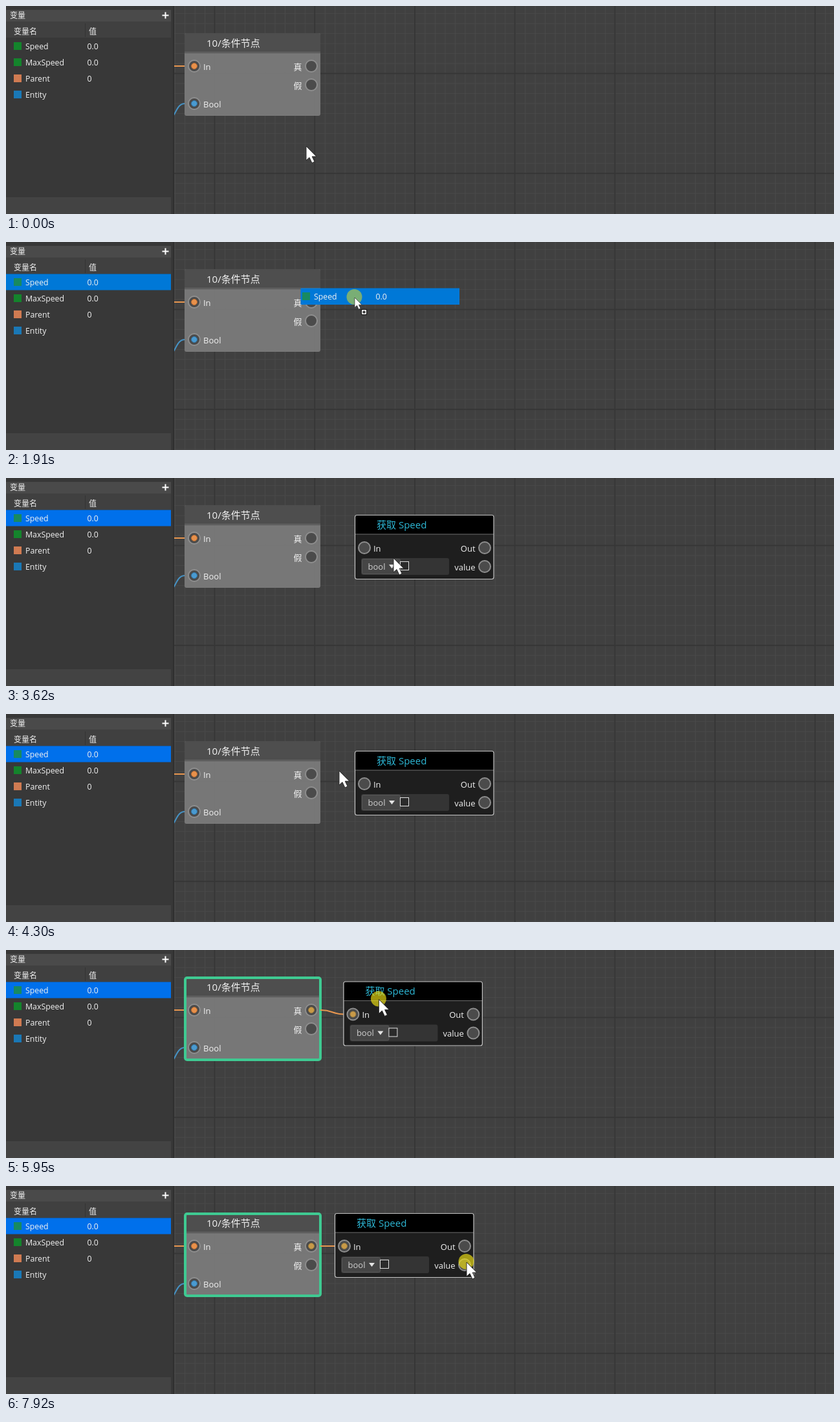
Animation of 1280x322 px, one loop 7990 ms. Source, as an HTML page:

```html
<!DOCTYPE html>
<html lang="zh">
<head>
<meta charset="utf-8">
<title>Node editor</title>
<style>
  html, body { margin: 0; width: 100%; height: 100%; overflow: hidden; background: #404040; }
  svg { display: block; width: 100vw; height: 100vh; }
  text { font: 12.3px "Open Sans", "Noto Sans CJK SC", "Noto Sans CJK", sans-serif; fill: #f2f2f2; white-space: pre; }
  .label { font-size: 13px; }
  .title { font-size: 15px; }
  .end { text-anchor: end; }
  .cyan { fill: #2db8d6; }
  .wire { fill: none; stroke: #e8964f; stroke-width: 2; }
  .dot { fill: #e8914b; stroke: #b8692f; }
  .blue { fill: #4a9ad0; stroke: #2f74a4; }
  .amber { fill: #c89a48; stroke: #9a7a3c; }
  .icon { fill: none; stroke: #d0d2da; stroke-width: 1.1; }
  .selected text { fill: #d8e6f2; }
</style>
</head>
<body>
<svg viewBox="0 0 1280 322" preserveAspectRatio="none">
  <defs>
    <pattern id="minor" x="13.2" y="11.2" width="15.47" height="15.47" patternUnits="userSpaceOnUse">
      <path d="M.5 0V15.47M0 .5H15.47" stroke="#494949"/>
    </pattern>
    <pattern id="major" x="12.2" y="103.5" width="154.7" height="154.7" patternUnits="userSpaceOnUse">
      <path d="M1 0V154.7M0 1H154.7" stroke="#363636" stroke-width="2"/>
    </pattern>
    <g id="port"><circle r="9" fill="#4b4b4b" stroke="#8e8e8e" stroke-width="2"/></g>
    <g id="speed">
      <rect x="12" y="56" width="12" height="12" fill="#188a60"/>
      <text x="30" y="67">Speed</text>
      <text x="125.500" y="67">0.0</text>
    </g>
    <g id="file" class="icon">
      <path d="M6 12.500H.5V.5H8L12.500 5V6M8 .5V5H12.500"/>
      <circle cx="11" cy="10.500" r="3.600"/>
      <path d="M9 10.500H13M11 8.500V12.500"/>
    </g>
  </defs>

  <rect width="1280" height="322" fill="#404040"/>
  <rect x="258" width="1022" height="322" fill="url(#minor)"/>
  <rect x="258" width="1022" height="322" fill="url(#major)"/>

  <!-- Wires into the condition node -->
  <path class="wire" d="M258 93H277"/>
  <path class="wire" style="stroke:#4692c4" d="M257 172C264 164 265 151 277 151"/>

  <!-- Condition node -->
  <rect x="276" y="42" width="210" height="128" rx="3" fill="#7b7b7b" fill-opacity=".94"/>
  <path d="M276 72V45Q276 42 279 42H483Q486 42 486 45V72Z" fill="#4e4e4e"/>
  <path d="M276 71.500H486" stroke="#6c6c6c"/>
  <path d="M276 72.500H486" stroke="#505050"/>
  <text class="title" x="310" y="63">10/条件节点</text>
  <use href="#port" x="291" y="93"/>
  <circle class="dot" cx="291" cy="93" r="4.500"/>
  <text class="label" x="305" y="98.500">In</text>
  <use href="#port" x="291" y="151"/>
  <circle class="dot blue" cx="291" cy="151" r="4.500"/>
  <text class="label" x="305" y="156.500">Bool</text>
  <text class="label end" x="457.500" y="98.500">真</text>
  <use href="#port" x="472" y="93"/>
  <circle id="trueDot" class="dot amber" cx="472" cy="93" r="4.500"/>
  <text class="label end" x="457.500" y="127.500">假</text>
  <use href="#port" x="472" y="122"/>
  <rect id="frame" x="277" y="43" width="209" height="127" rx="3" fill="none" stroke="#3fca92" stroke-width="4"/>

  <path id="wire" class="wire"/>

  <!-- Speed node -->
  <g id="node">
    <rect x="508.500" y="42.500" width="214.500" height="99" rx="3" fill="#1e1e1e"/>
    <path d="M509 72V43H723V72Z" fill="#000"/>
    <path d="M509 72H723" stroke="#6e6e6e"/>
    <rect x="508.500" y="42.500" width="214.500" height="99" rx="3" fill="none" stroke="#c4c4c4" stroke-width="1.200"/>
    <text class="title cyan" x="542" y="63">获取 Speed</text>
    <use href="#port" x="523" y="93"/>
    <circle id="inDot" class="dot amber" cx="523" cy="93" r="4.500"/>
    <text class="label" x="537" y="98.500">In</text>
    <text class="label end" x="694.500" y="98.500">Out</text>
    <use href="#port" x="709" y="93"/>
    <text class="label end" x="694.500" y="127.500">value</text>
    <use href="#port" x="709" y="122"/>
    <rect x="518" y="109" width="136" height="26" rx="3" fill="#343434"/>
    <rect x="519.500" y="110.500" width="59" height="23" rx="2" fill="#464646" stroke="#585858"/>
    <text class="label" x="528.500" y="127" style="fill:#cfcfcf">bool</text>
    <path d="M561 119H570L565.500 125Z" fill="#e4e4e4"/>
    <rect x="578.500" y="114.500" width="13" height="13" fill="#2b2b2b" stroke="#e0e0e0"/>
  </g>

  <!-- Variable panel -->
  <rect width="258" height="322" fill="#383838"/>
  <rect x="258" width="2" height="322" fill="#2f2f2f"/>
  <rect y="6" width="255" height="18" fill="#4a4a4a"/>
  <rect y="24" width="255" height="25" fill="#404040"/>
  <rect y="296" width="255" height="26" fill="#434343"/>
  <path d="M122.500 27V48" stroke="#333"/>
  <text x="6" y="19" style="font-size:12px">变量</text>
  <path d="M241.500 14.500H251.500M246.500 9.500V19.500" stroke="#fff" stroke-width="2"/>
  <text x="12" y="43.500" style="font-size:12px">变量名</text>
  <text x="128" y="43.500" style="font-size:12px">值</text>
  <rect x="12" y="56" width="12" height="12" fill="#14842c"/>
  <text x="30" y="67">Speed</text>
  <text x="125.500" y="67">0.0</text>
  <rect x="12" y="81" width="12" height="12" fill="#14842c"/>
  <text x="30" y="92">MaxSpeed</text>
  <text x="125.500" y="92">0.0</text>
  <rect x="12" y="106" width="12" height="12" fill="#d07b52"/>
  <text x="30" y="117">Parent</text>
  <text x="125.500" y="117">0</text>
  <rect x="12" y="131" width="12" height="12" fill="#1a78b6"/>
  <text x="30" y="142">Entity</text>
  <g id="row" class="selected">
    <rect id="rowFill" y="49.500" width="255" height="25"/>
    <use href="#speed"/>
  </g>

  <g id="ghost" class="selected">
    <rect x="9.500" y="49.500" width="245.500" height="25.500" fill="#0078d7"/>
    <use href="#speed"/>
  </g>

  <!-- Context menu -->
  <g id="menu">
    <rect x="543" y="88" width="116" height="50" fill="#000" opacity=".3"/>
    <rect x="540.500" y="85.500" width="116" height="50" fill="#494949" stroke="#303030"/>
    <rect id="hover" x="541" y="86" width="115" height="24" fill="#0070eb"/>
    <use href="#file" x="545" y="91"/>
    <text x="563" y="102.500">设置 Speed</text>
    <use href="#file" x="545" y="115.500" opacity=".85"/>
    <text x="563" y="127" style="fill:#d6d6d6">获取 Speed</text>
  </g>

  <circle id="halo" r="12" fill="#f2e314"/>
  <g id="cursor">
    <path id="arrow" d="M0 0V22L5 17.500L9 26L13 24L9.200 16H15.800Z" fill="#fff" stroke="#222" stroke-width=".9"/>
    <g id="badge">
      <rect x="10.500" y="18.500" width="8" height="8" fill="#fff" stroke="#111"/>
      <path d="M12 22.500H17M14.500 20V25" stroke="#111" stroke-width="1.300"/>
    </g>
  </g>
</svg>
<script>
  const LOOP = 7990, STEP = 70;
  const bursts = [0, 590, 1420, 2180, 2250, 2930, 3480, 3950, 4710, 5470, 5600, 6430, 7250, 7920];

  // Pointer path: time, x, y. A repeated position is a rest.
  const path = [
    [0, 464, 217], [520, 464, 217], [1290, 93, 64], [1420, 93, 64],
    [1680, 340, 101], [1910, 539, 86], [2180, 539, 86],
    [2600, 584, 104], [2860, 584, 104], [2930, 585, 105], [3280, 599, 124], [3880, 599, 124],
    [4300, 515, 88], [4380, 469, 75], [4510, 477, 94], [4710, 477, 94],
    [5130, 557, 113], [5200, 557, 113], [5470, 594, 85], [5530, 594, 85],
    [6300, 563, 70], [6360, 563, 70], [6710, 577, 73], [7060, 716, 100],
    [7180, 716, 100], [7390, 712, 118], [LOOP, 712, 118]
  ];
  const presses = [[1420, 2120], [3480, 3550], [4710, 5200], [5600, 6430], [7920, LOOP]];
  const HOME = { x: 563, y: 70 };

  const el = {};
  document.querySelectorAll('svg > [id], #node [id], #row [id], #menu [id], #cursor [id]')
    .forEach(e => el[e.id] = e);

  const show = (e, on) => e.style.display = on ? '' : 'none';
  const move = (e, x, y) => e.setAttribute('transform', `translate(${x} ${y})`);
  const within = (t, a, b) => t >= a && t < b;

  const isRest = (a, b) => !a || !b || (a[1] === b[1] && a[2] === b[2]);

  function slope(i, axis) {
    const a = path[i - 1], b = path[i], c = path[i + 1];
    return isRest(a, b) || isRest(b, c) ? 0 : (c[axis] - a[axis]) / (c[0] - a[0]);
  }

  function pointer(t) {
    let i = 0;
    while (i < path.length - 2 && path[i + 1][0] <= t) i++;
    const a = path[i], b = path[i + 1], d = b[0] - a[0], u = (t - a[0]) / d;
    const at = axis => {
      const s = u * u * (3 - 2 * u);
      return a[axis] + (b[axis] - a[axis]) * s
        + d * u * (1 - u) * ((1 - u) * slope(i, axis) - u * slope(i + 1, axis));
    };
    return { x: at(1), y: at(2) };
  }

  function draw(now) {
    const start = bursts.filter(b => b <= now).pop();
    const t = start + Math.floor((now - start) / STEP) * STEP;
    const p = pointer(t);

    // Variable row and its dragged copy
    const dragging = within(t, 1490, 2120);
    show(el.row, t >= 1420);
    el.rowFill.setAttribute('fill', t < 2120 ? '#0078d7' : '#0070eb');
    show(el.ghost, dragging);
    move(el.ghost, p.x - 93, p.y - 64);

    show(el.menu, within(t, 2250, 3550));
    el.hover.setAttribute('y', p.y < 110 ? 86 : 110.5);

    // Node follows the pointer while it is dragged
    const k = pointer(Math.min(Math.max(t, 5530), 6360));
    const dx = k.x - HOME.x, dy = k.y - HOME.y;
    show(el.node, t >= 3620);
    move(el.node, dx, dy);
    show(el.frame, t >= 5950);

    const linked = t >= 5200;
    show(el.wire, t >= 4710);
    show(el.trueDot, t >= 4710);
    show(el.inDot, linked);
    const x = linked ? 509 + dx : p.x, y = linked ? 93 + dy : p.y;
    const h = Math.abs(x - 487) / 2;
    el.wire.setAttribute('d', `M486 93H487C${487 + h} 93 ${x - h} ${y} ${x} ${y}`);

    show(el.halo, presses.some(([a, b]) => within(t, a, b)));
    el.halo.setAttribute('opacity', dragging ? .5 : .65);
    move(el.halo, p.x - .5, p.y - 1);
    move(el.cursor, p.x, p.y);
    el.arrow.setAttribute('transform', `scale(${dragging ? .7 : 1})`);
    show(el.badge, dragging);
  }

  const begin = performance.now();
  function tick() {
    draw((performance.now() - begin) % LOOP);
    requestAnimationFrame(tick);
  }
  tick();
</script>
</body>
</html>
```
